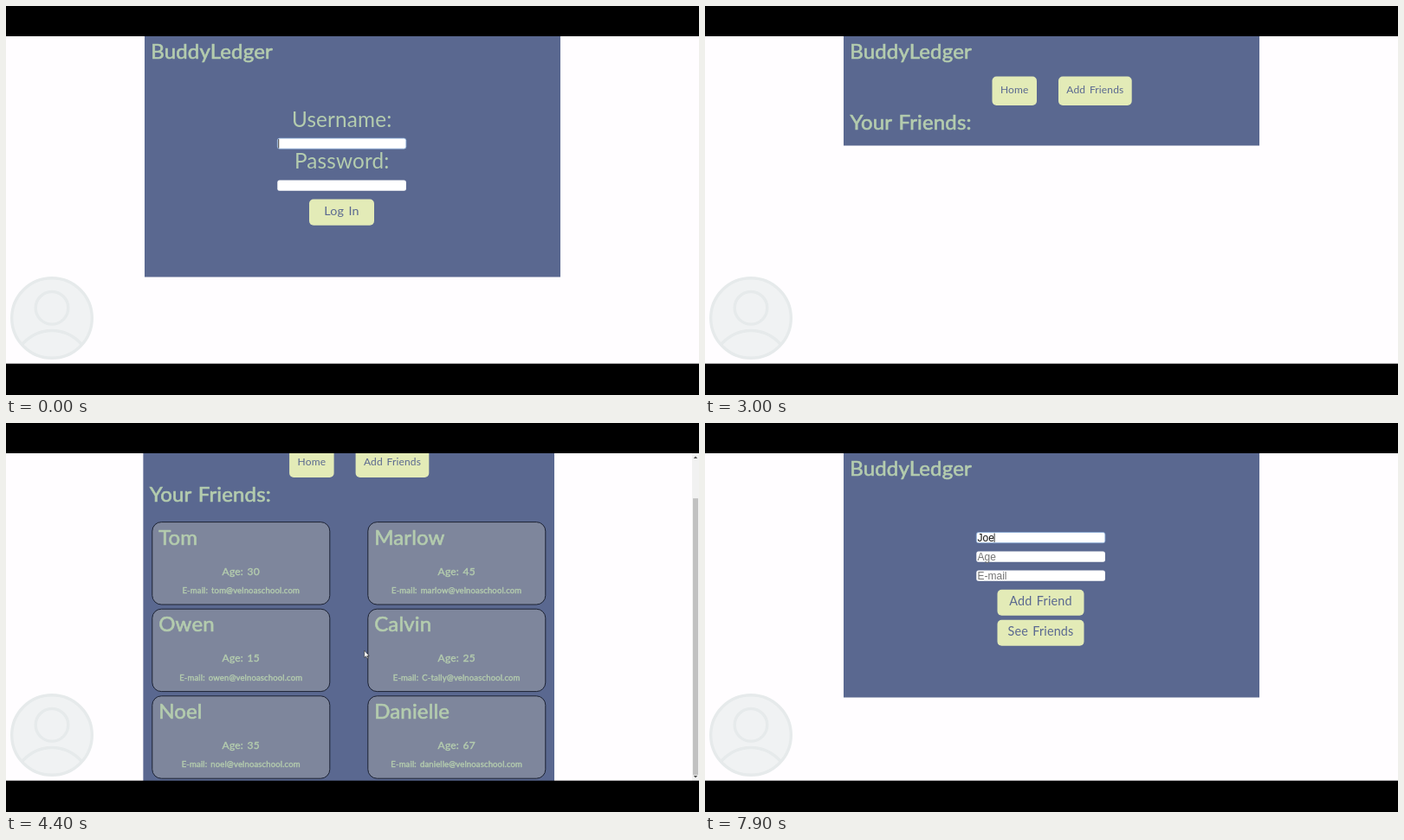
Animation of 800x450 px, one loop 8000 ms. Source, as an HTML page:

```html
<!DOCTYPE html>
<html lang="en">
<head>
<meta charset="utf-8">
<title>Friends app walkthrough</title>
<style>
  html, body { margin: 0; width: 100%; height: 100%; overflow: hidden; background: #fffdff; }
  svg { display: block; width: 800px; height: 450px; }
  text { font-family: Lato, "Open Sans", sans-serif; fill: #b4ccae; word-spacing: 1.5px; letter-spacing: .15px; white-space: pre; }
  .bold { stroke: #b4ccae; stroke-width: .65px; }
  .small { stroke-width: .4px; }
  .btn { fill: #5a6890; }
  .field { font: 12px "Liberation Sans", Arial, sans-serif; fill: #111; letter-spacing: 0; word-spacing: 0; }
  .hint { fill: #757575; }
  .mid { text-anchor: middle; }
</style>
</head>
<body>
<svg id="stage" viewBox="0 0 800 450" xmlns="http://www.w3.org/2000/svg"></svg>
<script>
const NS = 'http://www.w3.org/2000/svg';
const LOOP = 8000, STEP = 100;
const BLUE = '#5a6890', LIME = '#e3ebb7';
const stage = document.getElementById('stage');

function el(parent, tag, attrs = {}) {
  const node = document.createElementNS(NS, tag);
  set(node, attrs);
  parent.appendChild(node);
  return node;
}
function set(node, attrs) {
  for (const k in attrs) node.setAttribute(k, attrs[k]);
}
const group = parent => el(parent, 'g');
const rect = (p, x, y, width, height, fill, rx = 0) =>
  el(p, 'rect', { x, y, width, height, fill, rx });
function text(p, x, y, size, str, cls = '') {
  const t = el(p, 'text', { x, y, 'font-size': size, class: cls });
  t.textContent = str;
  return t;
}
function show(node, on) {
  node.style.display = on ? '' : 'none';
}
function button(p, x, y, w, h, size, label, base) {
  rect(p, x, y, w, h, LIME, 5);
  text(p, x + w / 2, base, size, label, 'btn mid');
}

// Text field with value, hint, caret and focus ring
function field(p, y, hint = '') {
  const box = rect(p, 313.3, y, 148.6, 12.2, '#fff', 2.5);
  const label = text(p, 314.5, y + 10.2, 12, '', 'field');
  label.removeAttribute('font-size');
  const caret = rect(p, 0, y + 1, 0.9, 10.4, '#222');
  return (value, focus, blink) => {
    const str = value || hint;
    if (label.textContent !== str) label.textContent = str;
    label.setAttribute('class', value ? 'field' : 'field hint');
    set(box, focus ? { stroke: '#86a9d6', 'stroke-width': 0.8 } : { stroke: 'none' });
    const w = value ? label.getComputedTextLength() : 0;
    caret.setAttribute('x', 314.3 + w);
    show(caret, focus && blink);
  };
}

function panel(p, x, w, h) {
  rect(p, x, 35, w, h, BLUE);
  text(p, x + 7.3, 60.5, 24, 'BuddyLedger', 'bold');
}
function friendsHead(p, x, dx) {
  button(p, 331.5 + dx, 81.5, 51.5, 33.5, 12, 'Home', 101);
  button(p, 408 + dx, 81.5, 84.7, 33.5, 12, 'Add Friends', 101);
  text(p, x, 143, 24, 'Your Friends:', 'bold');
}

rect(stage, 0, 0, 800, 450, '#fffdff');

// Login page
const login = group(stage);
panel(login, 160, 480, 278.5);
text(login, 387.7, 139.5, 24.3, 'Username:', 'mid');
text(login, 387.7, 188, 24.3, 'Password:', 'mid');
const user = field(login, 153);
const pass = field(login, 201.6);
button(login, 350, 223.5, 75, 30.2, 14.3, 'Log In', 242);

// Friends page before the data arrives
const empty = group(stage);
panel(empty, 160, 480, 126.5);
friendsHead(empty, 167.5, 0);

// Friends page with cards
const list = group(stage);
const scroller = group(list);
panel(scroller, 158.4, 474.6, 433);
friendsHead(scroller, 165.8, -4.4);
const people = [
  ['Tom', 30, 'tom'], ['Marlow', 45, 'marlow'],
  ['Owen', 15, 'owen'], ['Calvin', 25, 'C-tally'],
  ['Noel', 35, 'noel'], ['Danielle', 67, 'danielle']
];
people.forEach(([name, age, mail], i) => {
  const x = 168.8 + (i % 2) * 249, y = 166.6 + (i >> 1) * 100.6;
  const card = rect(scroller, x, y, 205, 95.4, '#7e869c', 10.5);
  set(card, { stroke: '#1c2233', 'stroke-width': 1 });
  text(scroller, x + 7.4, y + 26, 24, name, 'bold');
  text(scroller, x + 102.4, y + 61.2, 12, 'Age: ' + age, 'bold small mid');
  text(scroller, x + 102.4, y + 82.4, 9.5, `E-mail: ${mail}@velnoaschool.com`, 'bold small mid');
});
rect(list, 792, 35, 8, 379, '#f1f1f1');
el(list, 'path', { d: 'M793.8 41l2.2-2.6 2.2 2.6zM793.8 408l2.2 2.6 2.2-2.6z', fill: '#505050' });
const thumb = rect(list, 793, 43, 6, 320, '#c1c1c1');

// Add-friend form
const form = group(stage);
panel(form, 160, 480, 282.5);
const nameBox = field(form, 126.5, 'Name');
field(form, 148.6, 'Age')('', false);
field(form, 170.5, 'E-mail')('', false);
button(form, 337.5, 192.7, 100, 30, 14.4, 'Add Friend', 210.5);
button(form, 337.5, 227.8, 100, 30, 14.4, 'See Friends', 245.5);

// Avatar placeholder
const avatar = group(stage);
set(avatar, { fill: '#f0f2f3', stroke: '#e6eaeb', 'stroke-width': 3.4 });
el(avatar, 'circle', { cx: 53, cy: 361, r: 46.3 });
el(avatar, 'circle', { cx: 53, cy: 349.3, r: 18.8 });
el(avatar, 'path', { d: 'M18.5 391.5Q33 375.5 53 375.5T87.5 391.5', fill: 'none' });

// Mouse pointer
const pointer = group(stage);
const ink = { fill: '#fff', stroke: '#222', 'stroke-width': 0.6, 'stroke-linejoin': 'round' };
const arrow = el(pointer, 'path', { d: 'M0 0V8.2L1.9 6.5 3.2 9.3 4.4 8.7 3.2 6.1H5.6Z', ...ink });
const hand = el(pointer, 'path', {
  d: 'M-1.5 .8Q-.6-.6.3.8V4L3.6 4.7Q4.8 5 4.7 6.4L4 10.5H-.7L-3.6 6.8Q-3.6 5.4-2.4 5.8L-1.5 6.6Z', ...ink
});

rect(stage, 0, 0, 800, 35, '#000');
rect(stage, 0, 413.7, 800, 36.3, '#000');

// Linear track through [time, ...values] keys
function track(keys, t) {
  let i = 0;
  while (i < keys.length - 2 && t >= keys[i + 1][0]) i++;
  const a = keys[i], b = keys[i + 1];
  const k = Math.min(1, Math.max(0, (t - a[0]) / (b[0] - a[0])));
  return a.slice(1).map((v, n) => v + (b[n + 1] - v) * k);
}
const typed = (str, times, t) => str.slice(0, times.filter(x => t >= x).length);

const scrollKeys = [[3800, 0], [4000, 16.6], [4200, 52], [4400, 52], [4650, 0]];
const mouseKeys = [
  [3500, 412.5, 262], [4000, 413, 262.5], [4700, 414.2, 263.8], [4900, 415, 258],
  [5200, 432, 150], [5500, 438.5, 100.5], [5800, 438.5, 100.5], [6200, 345, 131]
];
const userTimes = [200, 300, 500, 700, 800];
const passTimes = Array.from({ length: 8 }, (_, i) => 1400 + i * 100);
const nameTimes = [7500, 7700, 7900];

function draw(t) {
  show(login, t < 2500);
  show(empty, t >= 2500 && t < 3500);
  show(list, t >= 3500 && t < 5800);
  show(form, t >= 5800);

  if (t < 2500) {
    user(typed('jonas', userTimes, t), t < 1000, true);
    pass(typed('••••••••', passTimes, t), t >= 1000, true);
  }
  if (t >= 5800) {
    nameBox(typed('Joe', nameTimes, t), t >= 6700, t < 7200 || t >= 7500);
  }

  const [s] = track(scrollKeys, t);
  set(scroller, { transform: `translate(0 ${-s})` });
  set(thumb, { y: 43 + s * 0.85 });

  const [x, y] = track(mouseKeys, t);
  const overLink = t >= 5400 && t <= 5800;
  show(pointer, t >= 3500 && t < 6200);
  set(pointer, { transform: `translate(${x} ${y})` });
  show(arrow, !overLink);
  show(hand, overLink);
}

const start = performance.now();
function tick() {
  const t = (performance.now() - start) % LOOP;
  draw(Math.floor(t / STEP) * STEP);
  requestAnimationFrame(tick);
}
draw(0);
requestAnimationFrame(tick);
</script>
</body>
</html>
```
